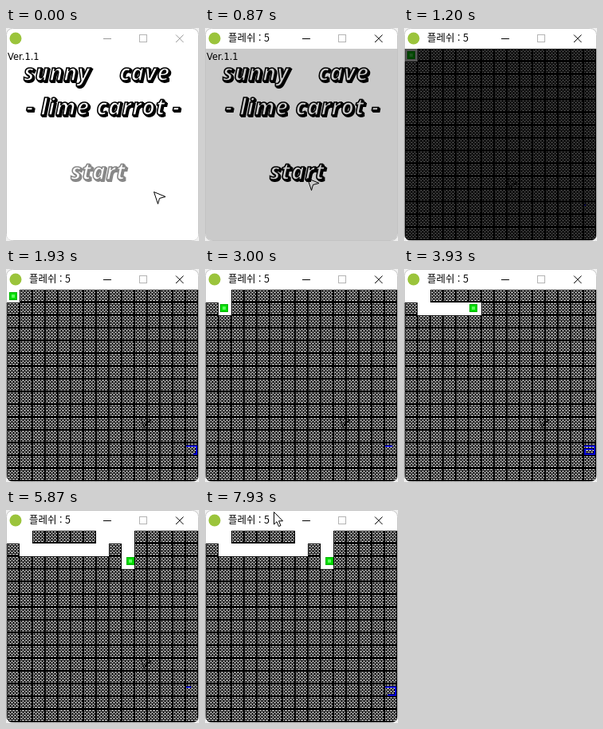
An HTML page that plays this animation: 242 by 267 pixels, repeating every 8 s.

```html
<!DOCTYPE html>
<html lang="ko">
<head>
<meta charset="utf-8">
<title>Maze</title>
<style>
  html, body { margin: 0; width: 100%; height: 100%; overflow: hidden; background: #fff; }
  svg { display: block; width: 242px; height: 267px; }
  .caption { font: 12.5px "Noto Sans CJK KR", "Noto Sans CJK", sans-serif; }
  .version { font: 11.5px "DejaVu Sans", sans-serif; }
  .logo { font: italic 700 28px "Open Sans", sans-serif; letter-spacing: 1px; text-anchor: middle; }
  .face { fill: #fff; stroke: currentColor; stroke-width: 1.6; }
  .depth { fill: currentColor; stroke: currentColor; stroke-width: 1.8; }
  .crisp { shape-rendering: crispEdges; }
</style>
</head>
<body>
<svg viewBox="0 0 242 267">
  <defs>
    <pattern id="bricks" x="1" y="26" width="16" height="16" patternUnits="userSpaceOnUse">
      <rect width="16" height="16"/>
      <path id="brickRows" fill="#fff" class="crisp"/>
    </pattern>
    <clipPath id="client">
      <path d="M1 26H241V259Q241 266 234 266H8Q1 266 1 259Z"/>
    </clipPath>
  </defs>

  <rect width="242" height="267" fill="#f0f0f0"/>
  <rect x=".5" y=".5" width="241" height="266" rx="8" fill="#fff" stroke="#c4c4c4"/>
  <circle cx="12" cy="13" r="7.5" fill="#9bc43c"/>
  <text id="caption" class="caption" x="29" y="17">플레쉬 : 5</text>
  <g fill="none" stroke="#999">
    <path id="minimize" d="M122 13.5H132"/>
    <rect x="167.5" y="8.5" width="9" height="9" stroke="#b4b4b4"/>
    <path id="close" d="M213 8.5L222.500 18M222.500 8.500L213 18"/>
  </g>

  <g clip-path="url(#client)">
    <g id="menu">
      <rect x="1" y="26" width="240" height="240" fill="#fff"/>
      <text class="version" x="2" y="40">Ver.1.1</text>
    </g>
    <g id="maze">
      <rect x="1" y="26" width="240" height="240" fill="url(#bricks)"/>
      <g id="floor" fill="#fff" class="crisp"></g>
      <path id="goal" fill="none" stroke="#0000d8" stroke-width="2" class="crisp"
        d="M226 222H239V232H227V226H236V229H230"/>
      <g id="player" class="crisp">
        <rect width="10" height="10" fill="#00b400"/>
        <rect x="1" y="1" width="8" height="8" fill="#00dc00"/>
        <rect x="3" y="3" width="4" height="4" fill="#5cff5c"/>
      </g>
    </g>
    <path id="dart" d="M.5 .5L15 6.500L7.500 8.500L5.500 15.500Z" fill="none" stroke="#000"/>
    <rect id="shade" x="1" y="26" width="240" height="240"/>
  </g>
  <path id="arrow" d="M.5 .5V16L4 12.700L6.500 18.500L9 17.500L6.500 11.800H11.500Z" fill="#fff" stroke="#000"/>
</svg>
<script>
const LOOP = 8000, RATE = 15;
const CELL = 16, LEFT = 1, TOP = 26, SIZE = 10;
const ROOM_STEP = 17, CLICK_STEP = 11, HOVER_STEP = 8;
const $ = id => document.getElementById(id);

function add(parent, tag, attrs, text = '') {
  const el = document.createElementNS('http://www.w3.org/2000/svg', tag);
  for (const name in attrs) el.setAttribute(name, attrs[name]);
  el.textContent = text;
  return parent.appendChild(el);
}

// Lettering: a solid slanted depth with an outlined face on top.
function logo(text, x, y, color) {
  const g = add($('menu'), 'g', { class: 'logo', color });
  for (const d of [2, 1]) add(g, 'text', { class: 'depth', x: x + d, y: y + d }, text);
  add(g, 'text', { class: 'face', x, y }, text);
  return g;
}
logo('sunny', 64, 66, '#000');
logo('cave', 174, 66, '#000');
logo('- lime carrot -', 122, 109, '#000');
const start = logo('start', 116, 190, '#888');

// Staggered bricks, three pixels wide and one high.
let rows = '';
for (let y = 1; y < 14; y += 2)
  for (let x = 1; x < 15; x++)
    if ((x + y) % 4 < 3) rows += `M${x} ${y}h1v1h-1z`;
$('brickRows').setAttribute('d', rows);

// Keys are [step, x, y].
const walk = [
  [32, 4, 29], [34.5, 19, 29], [36, 19, 29], [38.5, 19, 44],
  [48.5, 19, 44], [60, 88, 44], [66, 88, 44], [71, 118, 44],
  [72, 118, 44], [74.5, 118, 29], [75.5, 118, 29], [81, 151, 29],
  [82, 151, 29], [87, 151, 59]
];
const mouse = [
  [3, 185, 205], [9, 128, 188], [21, 128, 188], [27, 168, 184],
  [103, 168, 184], [107, 169, 181], [108, 169, 181],
  [115, 71, 20], [118, 86, 2]
];

function at(keys, step) {
  const next = keys.findIndex(key => key[0] > step);
  if (next === 0) return keys[0].slice(1);
  if (next < 0) return keys[keys.length - 1].slice(1);
  const a = keys[next - 1], b = keys[next];
  const u = (step - a[0]) / (b[0] - a[0]);
  return [1, 2].map(i => Math.round(a[i] + (b[i] - a[i]) * u));
}

// Every cell the player touches is opened for good.
const opened = new Map();
for (let step = ROOM_STEP; step < 120; step++) {
  const [x, y] = at(walk, step);
  for (const dx of [0, SIZE - 1])
    for (const dy of [0, SIZE - 1]) {
      const col = Math.floor((x + dx - LEFT) / CELL);
      const row = Math.floor((y + dy - TOP) / CELL);
      const name = col + ',' + row;
      if (opened.has(name)) continue;
      const el = add($('floor'), 'rect', {
        x: LEFT + col * CELL, y: TOP + row * CELL, width: CELL, height: CELL
      });
      opened.set(name, { el, step });
    }
}

const show = (el, on) => el.setAttribute('visibility', on ? 'visible' : 'hidden');
const move = (el, [x, y]) => el.setAttribute('transform', `translate(${x} ${y})`);
const clamp = v => Math.max(0, Math.min(1, v));

function goalLength(step) {
  if (step < 21) return 2;
  return Math.min(59, 3 * ((step - 21) % 22 + 1));
}

function draw(time) {
  const step = Math.floor((time % LOOP + 4) * RATE / 1000) % 120;
  const active = step >= CLICK_STEP, inMaze = step >= ROOM_STEP;

  show($('caption'), active);
  for (const id of ['minimize', 'close']) $(id).setAttribute('stroke', active ? '#000' : '#999');
  start.setAttribute('color', step >= HOVER_STEP ? '#000' : '#888');

  $('menu').style.display = inMaze ? 'none' : '';
  $('maze').style.display = inMaze ? '' : 'none';
  $('shade').setAttribute('opacity',
    clamp(inMaze ? 0.67 - 0.22 * (step - 18) : 0.207 * (step - 12)));

  move($('player'), at(walk, step));
  for (const cell of opened.values()) show(cell.el, step >= cell.step);
  $('goal').setAttribute('stroke-dasharray', goalLength(step) + ' 100');

  const pointer = at(mouse, step), outside = pointer[1] < TOP;
  move($('dart'), pointer);
  move($('arrow'), pointer);
  show($('dart'), !outside);
  show($('arrow'), outside);
}

let begin;
function tick(now) {
  begin ??= now;
  draw(now - begin);
  requestAnimationFrame(tick);
}
draw(0);
requestAnimationFrame(tick);
</script>
</body>
</html>
```
